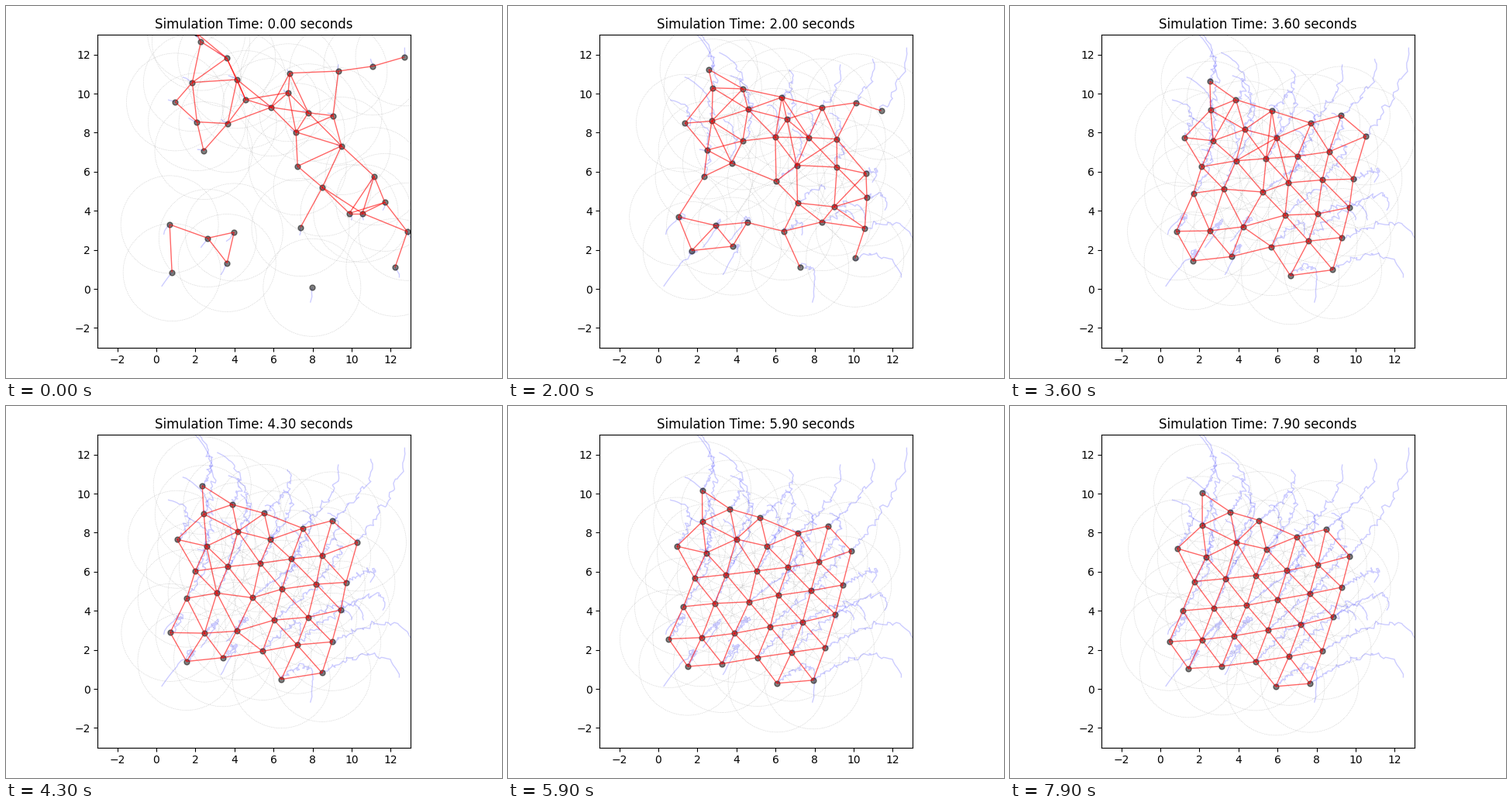
Write a matplotlib script that moves like this. It is 640 by 480 pixels and loops after 8 s.

```python
import numpy as np
import matplotlib.pyplot as plt
from matplotlib.animation import FuncAnimation
from matplotlib.collections import LineCollection

FPS, FRAMES, LEAD = 10, 80, 3
RANGE = 2.5          # radio range: circle radius and link length
SETTLE = 2.1         # time constant of the approach to the lattice, s
DRIFT_PEAK = 1.5     # moment of the strongest drift, s

# Scattered start, in the order of the lattice rows below.
start = np.array([
    (7.97, 0.07), (12.22, 1.1),
    (0.8, 0.85), (3.62, 1.33), (7.38, 3.15), (9.88, 3.87), (12.85, 2.93),
    (0.68, 3.3), (2.63, 2.6), (3.98, 2.9), (8.5, 5.2), (10.55, 3.87), (11.7, 4.43),
    (2.42, 7.08), (3.65, 8.47), (7.23, 6.28), (7.15, 8.03), (9.48, 7.32), (11.15, 5.77),
    (2.08, 8.55), (4.57, 9.7), (5.88, 9.3), (7.78, 9.02), (9.05, 8.87), (12.7, 11.87),
    (0.97, 9.57), (1.84, 10.57), (4.13, 10.72), (6.75, 10.05), (9.32, 11.15), (11.07, 11.4),
    (2.28, 12.66), (3.6, 11.82), (6.83, 11.05),
    (2.05, 13.1)])

# Lattice rows from the bottom: first x, first y, agents, zigzag.
ROWS = [(5.8, 0.05, 2, 0), (1.4, 0.97, 5, 0), (0.4, 2.33, 6, 0), (1.05, 3.87, 6, 0),
        (1.68, 5.38, 6, 0), (0.8, 6.8, 6, 0.3), (2.1, 8.55, 3, -0.3), (2.1, 9.96, 1, 0)]


def lattice_row(row, x, y, count, zigzag):
    """Slightly upward-bending row; higher rows are packed tighter."""
    k = np.arange(count)
    bend = 0.09 * k + 0.033 * k**2
    return np.column_stack([x + (1.69 - 0.007 * row**2) * k,
                            y + bend + zigzag * (-1.0)**k * (k < 4)])


slots = np.vstack([lattice_row(i, *row) for i, row in enumerate(ROWS)])
drift = np.column_stack([np.full(len(slots), 0.7), 1.1 - 0.1 * slots[:, 1]])
rng = np.random.default_rng(4)
phase = rng.uniform(0, 2 * np.pi, (3, *start.shape))


def spread_out(p, gap):
    """Push apart agents closer than the gap."""
    for _ in range(4):
        away = p[:, None] - p[None]
        dist = np.hypot(away[..., 0], away[..., 1]) + 9 * np.eye(len(p))
        push = np.clip(gap - dist, 0, None) / dist
        p = p + 0.25 * (away * push[..., None]).sum(axis=1)
    return p


def positions(t):
    done = 1 - np.exp(-t / SETTLE)
    swell = t / DRIFT_PEAK * np.exp(1 - t / DRIFT_PEAK)
    jitter = sum(np.sin(w * t + f) for w, f in zip((6, 11, 19), phase))
    p = start + (slots - start) * done + swell * (drift + 0.07 * jitter)
    return spread_out(p, 1.4 * done)


times = np.arange(-LEAD, FRAMES) / FPS
paths = np.stack([positions(t) for t in times])
first, second = np.triu_indices(len(start), 1)

fig = plt.figure(figsize=(6.4, 4.8), dpi=100)
ax = fig.add_axes([0.185, 0.082, 0.63, 0.84])
ax.set(xlim=(-3, 13), ylim=(-3, 13))
title = ax.set_title("")

rings = [ax.add_patch(plt.Circle(p, RANGE, fill=False, ec="gray", ls=":",
                                 lw=0.5, alpha=0.5)) for p in start]
trails = ax.add_collection(LineCollection(
    [], colors="blue", linewidths=1, alpha=0.2, zorder=2), autolim=False)
nodes, = ax.plot([], [], "ko", ms=5, alpha=0.5, zorder=3)
links = ax.add_collection(LineCollection(
    [], colors="red", linewidths=1, alpha=0.6, zorder=4), autolim=False)


def draw(i):
    p = paths[i + LEAD]
    title.set_text(f"Simulation Time: {i / FPS:.2f} seconds")
    for ring, centre in zip(rings, p):
        ring.center = centre
    trails.set_segments(list(paths[:i + LEAD + 1].swapaxes(0, 1)))
    near = np.hypot(*(p[first] - p[second]).T) < RANGE
    links.set_segments(list(np.stack([p[first[near]], p[second[near]]], axis=1)))
    nodes.set_data(p[:, 0], p[:, 1])


anim = FuncAnimation(fig, draw, frames=FRAMES, interval=1000 / FPS,
                     init_func=lambda: draw(0), repeat=True, repeat_delay=0)
plt.show()
```
